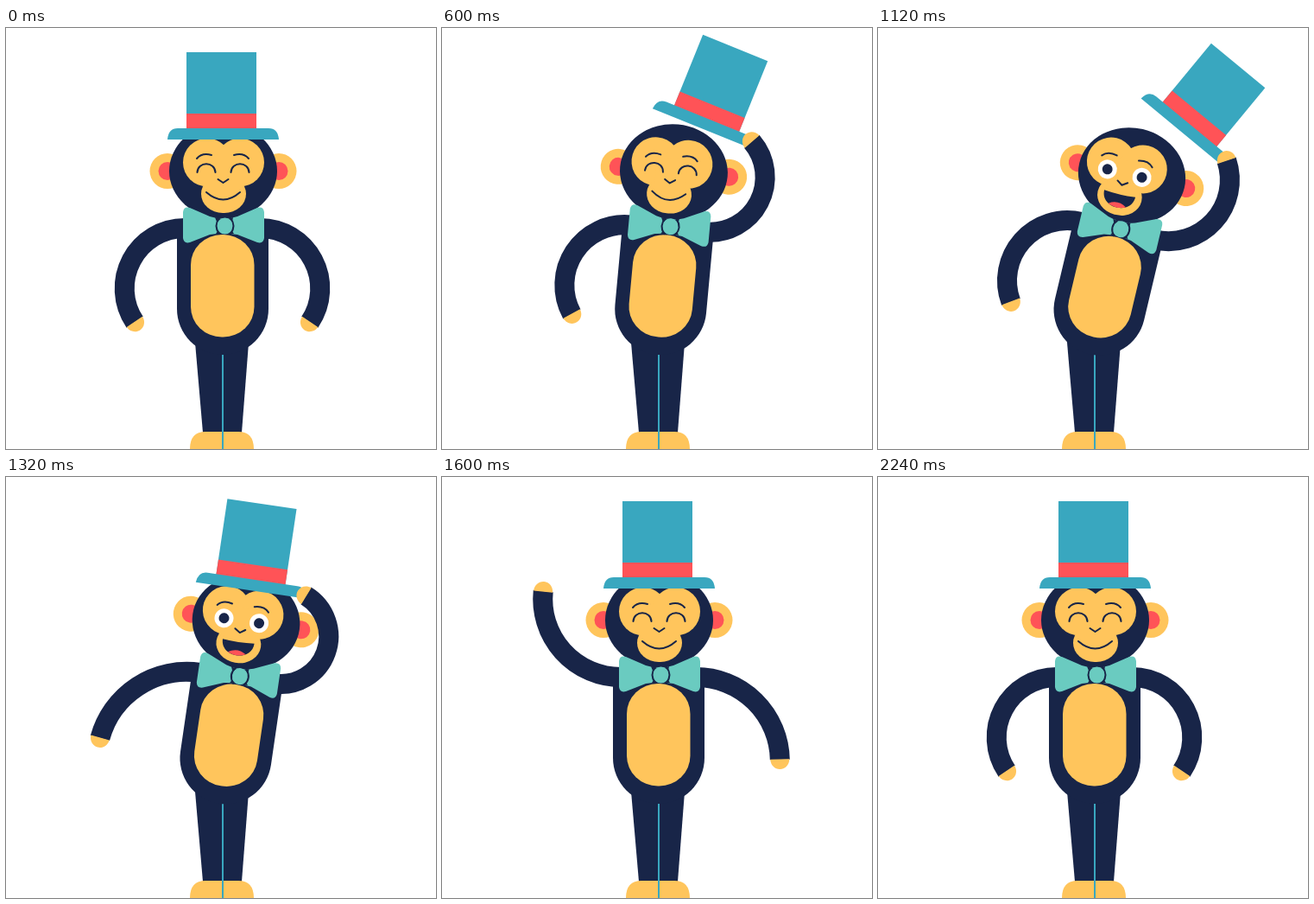
Animation, 498 px wide and 487 px high, one loop 2400 ms. Source, as an HTML page:

```html
<!DOCTYPE html>
<html lang="en">
<head>
<meta charset="utf-8">
<title>Monkey tipping its hat</title>
<style>
  html, body { margin: 0; width: 100%; height: 100%; overflow: hidden; background: #fff; }
  svg { display: block; width: 100vw; height: 100vh; }
  .navy { fill: #182548; }
  .gold { fill: #ffc55c; }
  .red { fill: #ff5357; }
  .blue { fill: #39a7bf; }
  .mint { fill: #6acbc0; }
  .line { fill: none; stroke: #182548; stroke-width: 2; stroke-linecap: round; stroke-linejoin: round; }
  .sleeve { fill: none; stroke: #182548; stroke-width: 23; }
</style>
</head>
<body>
<svg viewBox="0 0 498 487">
  <g id="legs">
    <path class="navy" d="M218.500 358H281.500L273 468H228Z"/>
    <path class="gold" d="M213 487Q213 467 231 467H269Q287 467 287 487Z"/>
    <path d="M251 378V487" stroke="#39a7bf" stroke-width="2"/>
  </g>
  <g id="body">
    <path class="navy" d="M198 240Q198 215 222 215H280Q304 215 304 240V325A53 53 0 0 1 198 325Z"/>

    <g id="head">
      <g class="gold"><circle cx="187" cy="165.500" r="20.500"/><circle cx="316" cy="165.500" r="20.500"/></g>
      <g class="red"><circle cx="187" cy="165.500" r="10.500"/><circle cx="316" cy="165.500" r="10.500"/></g>
      <ellipse class="navy" cx="251.500" cy="165.500" rx="62.500" ry="55"/>
      <g id="face">
        <g class="gold">
          <circle cx="233" cy="155.500" r="28"/>
          <circle cx="271" cy="155.500" r="28"/>
          <rect x="226" y="170" width="52" height="44" rx="25" ry="24"/>
          <rect x="234" y="150" width="36" height="40"/>
        </g>
        <path class="line" d="M221 151Q227 144 238 147M264 147Q275 144 281 151M245.500 175L251.500 179L257.500 175"/>
        <path id="smiling" class="line" d="M221.500 167C222 154 242 154 242.500 167M260.500 167C261 154 281 154 281.500 167M232 190Q251.500 207 271 190"/>
        <g id="laughing">
          <g fill="#fff"><circle cx="231" cy="165" r="11"/><circle cx="272" cy="165" r="11"/></g>
          <g class="navy"><circle cx="231" cy="165" r="6"/><circle cx="272" cy="165" r="6"/></g>
          <path class="navy" d="M233 189Q251.500 191 270 189C270 211 233 211 233 189Z"/>
          <path class="red" d="M241 203Q251.500 196 262 203Q251.500 208 241 203Z"/>
        </g>
      </g>
    </g>

    <g id="hat">
      <path class="blue" d="M209 28H290V117H209Z"/>
      <path class="red" d="M209 99H290V117H209Z"/>
      <path class="blue" d="M187 129Q188 116 199 116H304Q315 116 316 129Z"/>
    </g>

    <g transform="translate(207 231.500) scale(-1 1)"><path id="leftSleeve" class="sleeve"/><path id="leftHand" class="gold"/></g>
    <g transform="translate(294 231.500)"><path id="rightSleeve" class="sleeve"/><path id="rightHand" class="gold"/></g>

    <rect class="gold" x="214" y="239" width="73.500" height="118.500" rx="36" ry="35"/>
    <path class="mint" d="M205 213Q206 206 213 208L236 218Q252 223 268 218L291 208Q298 206 299 213V243Q298 250 291 248L268 239Q252 236 236 239L213 248Q206 250 205 243Z"/>
    <path class="navy" d="M242 219Q252 223 263 219L262 224H244ZM243 238H264L262 235H245Z"/>
    <circle class="mint" cx="253.500" cy="229" r="9.500"/>
    <path class="line" d="M247 220Q240 229 247 238M260 220Q267 229 260 238"/>
  </g>
</svg>
<script>
const LOOP = 2400, STEP = 40, ARM = 151;
const el = id => document.getElementById(id);

// Each track is a list of [time in ms, value].
const tracks = {
  lean: [[0, 0], [510, 0], [600, 5.3], [760, 19], [1000, 19], [1120, 13.4], [1440, 5.3], [1590, 0], [LOOP, 0]],
  lift: [[0, 0], [440, 0], [600, .5], [760, 1], [1000, 1], [1120, .78], [1330, 0], [LOOP, 0]],
  right: [[0, -124], [120, -20], [240, 90], [420, 157], [600, 136], [760, 118], [1000, 118], [1120, 122],
          [1330, 157], [1440, 58], [1560, -60], [1680, -124], [LOOP, -124]],
  left: [[0, -124], [1230, -124], [1440, 10], [1640, 102], [2000, 102], [2120, -11], [2240, -124], [LOOP, -124]]
};

// Smooth curve through the keys that never overshoots them.
function sample(keys, t) {
  const rate = i => (keys[i + 1][1] - keys[i][1]) / (keys[i + 1][0] - keys[i][0]);
  const slope = i => {
    if (i === 0 || i === keys.length - 1) return 0;
    const a = rate(i - 1), b = rate(i);
    return a * b > 0 ? 2 * a * b / (a + b) : 0;
  };
  const i = keys.findIndex((key, k) => k + 1 < keys.length && t < keys[k + 1][0]);
  const [t0, v0] = keys[i], [t1, v1] = keys[i + 1];
  const span = t1 - t0, u = (t - t0) / span, w = 1 - u;
  return v0 * w * w * (1 + 2 * u) + v1 * u * u * (3 - 2 * u)
    + span * u * w * (slope(i) * w - slope(i + 1) * u);
}

// An arm is an arc of fixed length; a positive bend curls it upwards.
function bendArm(side, degrees) {
  const bend = Math.abs(degrees) < .5 ? .01 : degrees * Math.PI / 180;
  const radius = ARM / bend;
  const x = radius * Math.sin(bend), y = radius * (Math.cos(bend) - 1);
  const r = Math.abs(radius);
  el(side + "Sleeve").setAttribute("d", `M-10 0H0A${r} ${r} 0 0 ${bend > 0 ? 0 : 1} ${x} ${y}`);
  el(side + "Hand").setAttribute("transform", `translate(${x} ${y}) rotate(${-degrees})`);
}

function draw(t) {
  const lean = sample(tracks.lean, t), lift = sample(tracks.lift, t);
  const laughing = t >= 680 && t < 1560;
  el("body").setAttribute("transform", `rotate(${lean} 251 349)`);
  el("face").setAttribute("transform", `translate(${-.65 * lean} 0)`);
  el("hat").setAttribute("transform", `translate(${61 * lift} ${-31 * lift}) rotate(${33.500 * lift} 251.5 129)`);
  el("laughing").style.display = laughing ? "" : "none";
  el("smiling").style.display = laughing ? "none" : "";
  bendArm("left", sample(tracks.left, t));
  bendArm("right", sample(tracks.right, t));
}

for (const side of ["left", "right"])
  el(side + "Hand").setAttribute("d", "M-.5 -11C6 -11 11 -6 11 0S6 11 -.5 11Z");

const start = performance.now();
function tick() {
  const t = (performance.now() - start) % LOOP;
  draw(Math.floor(t / STEP) * STEP);
  requestAnimationFrame(tick);
}
tick();
</script>
</body>
</html>
```
